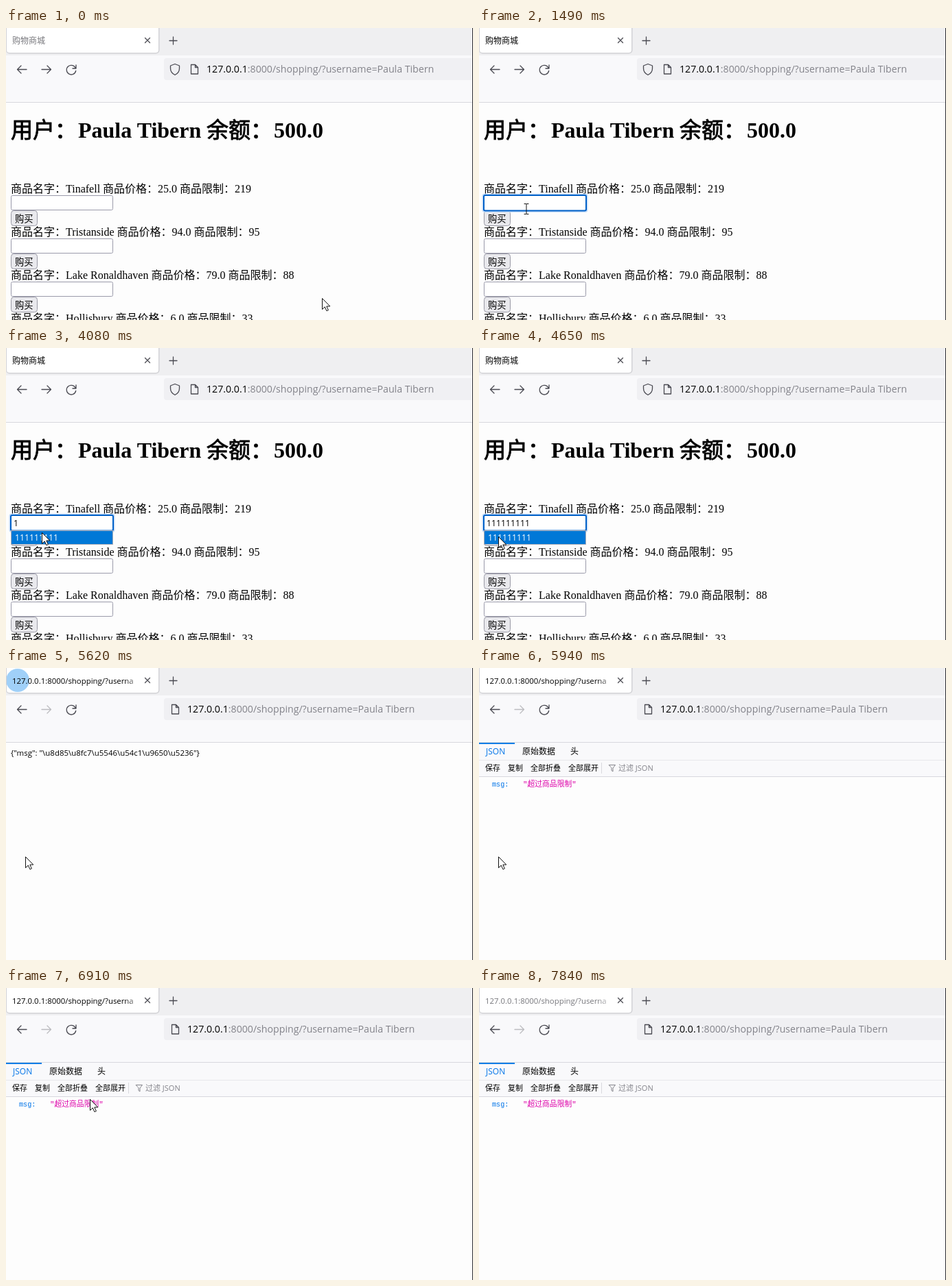
Animation, 680 px wide and 426 px high, one loop 8.04 s. Source, as an HTML page:

```html
<!DOCTYPE html>
<html lang="zh-CN">
<head>
<meta charset="utf-8">
<style>
html, body { margin: 0; width: 100%; height: 100%; overflow: hidden; background: #fdfdfd; }
svg { display: block; }
text { font-family: "Open Sans", "Noto Sans CJK SC", sans-serif; white-space: pre; fill: #000; }
.page text { font: 16px "Liberation Serif", "Noto Sans CJK SC", serif; }
.page .head { font-size: 32px; font-weight: bold; }
.head .cjk { font-weight: 400; stroke: #000; stroke-width: .8; }
.page .ui { font: 13.3px "Noto Sans CJK SC", sans-serif; }
.page .num { font: 12.25px "Open Sans", sans-serif; }
.page .title { font-size: 12px; }
.title { font-size: 11.4px; }
.url, .page .url { font: 14.15px "Open Sans", sans-serif; }
.soft { fill: #83838a; }
.tabs { font-size: 12px; }
.tools { font-size: 11px; }
.mono { font: 10.8px "Liberation Mono", "Noto Sans CJK SC", monospace; }
.icon { fill: none; stroke: #4a4a52; stroke-width: 1.3; stroke-linecap: round; stroke-linejoin: round; }
.field { fill: #fff; stroke: #9a9aaa; }
.button { fill: #e9e9ed; stroke: #9a9aa6; }
.line { fill: #d8d8de; }
.cursor { fill: #fff; stroke: #111; stroke-linejoin: round; }
</style>
</head>
<body>
<svg width="680" height="426" viewBox="0 0 680 426">
  <defs>
    <linearGradient id="fade">
      <stop offset="0" stop-color="#fff" stop-opacity="0"/>
      <stop offset="1" stop-color="#fff"/>
    </linearGradient>
    <clipPath id="tabClip"><rect x="1" y="0" width="221" height="36"/></clipPath>
  </defs>

  <rect width="680" height="426" fill="#fdfdfd"/>
  <rect width="680" height="40" fill="#efeff1"/>
  <rect y="40" width="680" height="68" fill="#f9f9fb"/>
  <rect class="line" y="108" width="680" height="1"/>
  <rect x="230" y="44" width="460" height="32" rx="4" fill="#f0f0f3"/>
  <rect x="0" y="-6" width="223.5" height="43.5" rx="5" fill="#d2d2d6"/>
  <rect x="1" y="-6" width="221" height="42" rx="4" fill="#fff"/>
  <circle id="burst" cx="17" cy="18" fill="#5fb0f4" clip-path="url(#tabClip)"/>
  <path class="icon" d="M202.500 14.500l7 7m0-7l-7 7M238 18.500h11m-5.500-5.500v11"/>
  <path class="icon" d="M30 60.500H16.500m5.500-5.500l-5.500 5.500 5.500 5.500"/>
  <path class="icon" id="forward" d="M52 60.500h13.500m-5.500-5.500l5.500 5.500-5.500 5.500"/>
  <path class="icon" d="M101.500 59a6.800 6.800 0 1 0 .2 3.500M102 54v5h-5"/>

  <g id="shop" class="page">
    <text id="shopTitle" class="ui title" x="9" y="23">购物商城</text>
    <path class="icon" d="M246 52.500l6.500 2.500v4c0 4.500-2.500 7.500-6.500 9.500-4-2-6.500-5-6.500-9.500v-4z"/>
    <path class="icon" d="M269.500 53.500h6l4 4v9.500h-10zM275.500 53.500v4h4"/>
    <text class="url" x="292" y="65">127.0.0.1<tspan class="soft">:8000/shopping/?username=Paula Tibern</tspan></text>
    <text class="head" x="7" y="160"><tspan class="cjk">用户：</tspan><tspan x="105">Paula Tibern</tspan><tspan class="cjk" x="292">余额：</tspan><tspan x="390">500.0</tspan></text>
    <g id="rows"></g>
    <g id="focus">
      <rect x="4.5" y="241.500" width="154" height="27.5" rx="4" fill="#c4dcf8"/>
      <rect x="7" y="244" width="149" height="22.5" rx="2" fill="#fff" stroke="#0060c8" stroke-width="2"/>
    </g>
    <text id="value" class="num" x="11" y="260"></text>
    <rect id="caret" y="248" width="1" height="15"/>
    <g id="popup">
      <rect id="option" x="7.5" y="266.500" width="148" height="20" stroke="#b0b0b8"/>
      <text id="optionText" class="num" x="13" y="281">111111111</text>
    </g>
  </g>

  <g id="result">
    <text id="resultTitle" class="title" x="9" y="23">127.0.0.1:8000/shopping/?userna</text>
    <rect x="172" y="8" width="28" height="20" fill="url(#fade)"/>
    <path class="icon" d="M241.500 53.500h6l4 4v9.500h-10zM247.500 53.500v4h4"/>
    <text class="url" x="264" y="65">127.0.0.1<tspan class="soft">:8000/shopping/?username=Paula Tibern</tspan></text>
    <text id="raw" x="7" y="128" style="font-size:11.45px">{"msg": "\u8d85\u8fc7\u5546\u54c1\u9650\u5236"}</text>
    <g id="viewer">
      <rect y="109" width="680" height="49" fill="#f9f9fb"/>
      <rect class="line" y="134" width="680" height="1" opacity=".5"/>
      <rect class="line" y="158" width="680" height="1"/>
      <rect y="109" width="52" height="2" fill="#0a7de6"/>
      <rect id="hover" x="127" y="136" width="52" height="21" fill="#ededf0"/>
      <rect class="line" x="178" y="138" width="1" height="16"/>
      <text class="tabs" y="126"><tspan x="10" fill="#0074e8">JSON</tspan><tspan x="63">原始数据</tspan><tspan x="133">头</tspan></text>
      <text class="tools" y="150"><tspan x="9">保存</tspan><tspan x="42">复制</tspan><tspan x="75">全部折叠</tspan><tspan x="130">全部展开</tspan><tspan x="203" class="soft">过滤 JSON</tspan></text>
      <path class="icon" style="stroke:#83838a;stroke-width:1" d="M189.500 141.500h9l-3.500 4.500v5l-2-1.500v-3.500z"/>
      <text class="mono" y="173"><tspan x="19" fill="#0074e8" style="font-size:10.2px">msg:</tspan><tspan x="64" fill="#dd00a9">"超过商品限制"</tspan></text>
    </g>
  </g>

  <rect x="679" width="1" height="426" fill="#2c2c30"/>
  <g id="cursor">
    <path id="arrow" class="cursor" d="M.5 .5v16l3.800-3.600 2.600 5.800 2.500-1.100-2.600-5.600h5z"/>
    <path id="beam" class="icon" style="stroke:#111;stroke-width:1" d="M-3-7.500h2.500l.5.500.5-.5H3M0-7V7M-3 7.500h2.500L0 7l.5.500H3"/>
    <path id="hand" class="cursor" d="M-1.500 12V1.500q0-1.500 1.500-1.500t1.500 1.500v6q2.500-1.500 3 .5 2.500-1 3 1 2.500-.8 2.500 1.500v5q0 3-2 4.500v2.500h-8.500v-2.500l-5-6.500q-1.500-2.500 0-3t4 2z"/>
  </g>
</svg>
<script>
const LOOP = 8040;
const $ = id => document.getElementById(id);
const show = (id, on) => $(id).style.display = on ? "" : "none";
const clamp = v => Math.max(0, Math.min(1, v));

const goods = [
  ["Tinafell", "25.0", 219],
  ["Tristanside", "94.0", 95],
  ["Lake Ronaldhaven", "79.0", 88],
  ["Hollisbury", "6.0", 33]
];
$("rows").innerHTML = goods.map(([name, price, limit], i) => `<g transform="translate(0 ${i * 63})">
  <text x="7" y="240">商品名字：${name} 商品价格：${price} 商品限制：${limit}</text>
  <rect class="field" x="7.5" y="244.500" width="148" height="21" rx="2"/>
  <rect class="button" x="7.5" y="266.500" width="38" height="22" rx="4"/>
  <text class="ui" x="13" y="283">购买</text></g>`).join("");
const buyButton = document.querySelector(".button");

// pointer path: time, x, y
const path = [
  [40, 460, 394], [770, 69, 264], [3760, 69, 264], [4480, 28, 275],
  [5980, 28, 275], [6420, 150, 146], [6510, 34, 146], [6750, 80, 129],
  [6790, 80, 129], [7390, 480, 440]
];

function pointer(t) {
  const i = path.findIndex(k => k[0] > t);
  if (i < 1) return path[i < 0 ? path.length - 1 : 0].slice(1);
  const [t0, x0, y0] = path[i - 1], [t1, x1, y1] = path[i];
  const p = (t - t0) / (t1 - t0), e = p * p * (3 - 2 * p);
  return [x0 + (x1 - x0) * e, y0 + (y1 - y0) * e];
}

function draw(t) {
  const loaded = t >= 5460, json = t >= 5740;
  show("shop", !loaded);
  show("result", loaded);
  show("raw", !json);
  show("viewer", json);
  $("forward").style.opacity = loaded ? 0.35 : 1;
  $("shopTitle").style.fill = t < 970 ? "#77777c" : "#000";
  $("resultTitle").style.fill = t < 7800 ? "#000" : "#77777c";

  const typed = t >= 3270, filled = t >= 4650;
  show("focus", t >= 970 && t < 5170);
  $("value").textContent = filled ? "111111111" : typed ? "1" : "";
  show("caret", t >= 970 && !filled && Math.floor((t - 960) / 530) % 2 === 0);
  $("caret").setAttribute("x", typed ? 18 : 11);

  const picked = t >= 3960;
  show("popup", t >= 3310 && t < 4810);
  $("popup").style.opacity = 1 - clamp((t - 4670) / 140);
  $("option").style.fill = picked ? "#0078d7" : "#fff";
  $("optionText").style.fill = picked ? "#fff" : "#000";
  buyButton.style.fill = t >= 4810 ? "#d0d0d7" : "";

  const b = clamp((t - 5480) / 375);
  show("burst", b > 0 && b < 1);
  $("burst").setAttribute("r", 20 * (1 - (1 - b) ** 4));
  $("burst").style.opacity = 0.95 * (1 - b);

  const [x, y] = pointer(t);
  const beam = t >= 650 && t < 3880;
  const hand = json && y < 158;
  $("cursor").setAttribute("transform", `translate(${Math.round(x)} ${Math.round(y)})`);
  show("cursor", t < 7390);
  show("beam", beam);
  show("hand", hand);
  show("arrow", !beam && !hand);
  show("hover", t >= 6330 && t < 6530);
}

const start = performance.now();
function tick() {
  draw((performance.now() - start) % LOOP);
  requestAnimationFrame(tick);
}
tick();
</script>
</body>
</html>
```
